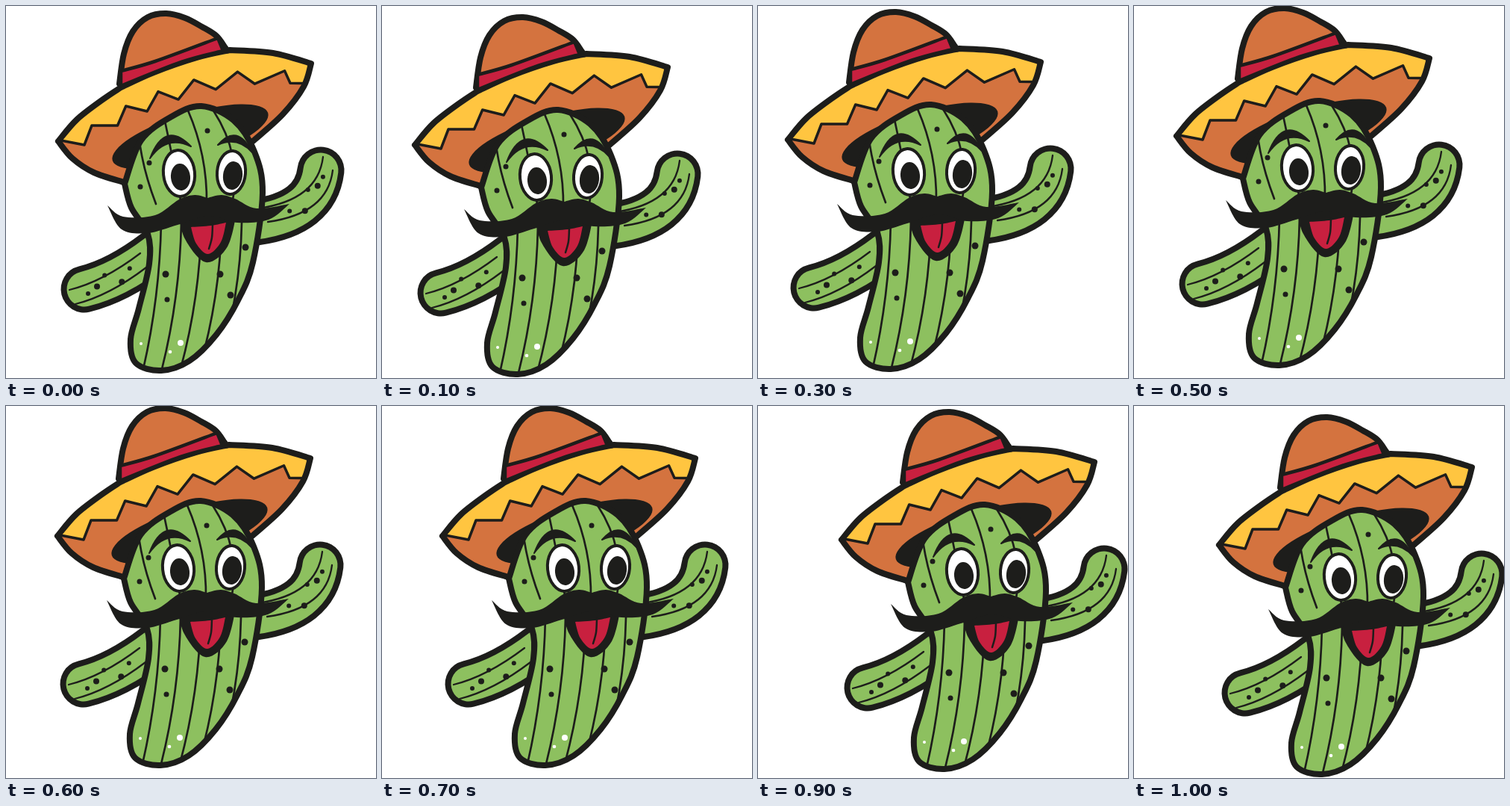
Recreate the animation shown at these times as an HTML page with a canvas. Size 496 by 498 pixels, loop 1200 ms.

```html
<!DOCTYPE html>
<html lang="en">
<head>
<meta charset="utf-8">
<title>Dancing cactus</title>
<style>
html, body { margin: 0; width: 100%; height: 100%; overflow: hidden; background: #fff; }
canvas { display: block; }
</style>
</head>
<body>
<canvas id="stage" width="496" height="498"></canvas>
<script>
const ctx = document.getElementById('stage').getContext('2d');
const INK = '#1d1d1b', GREEN = '#8dc05f', ORANGE = '#d4733f';
const YELLOW = '#ffc540', RED = '#c8203f', WHITE = '#fff';

// Smooth curve through "x,y x,y ..."; "|" makes a corner.
function curve(text) {
  const path = new Path2D();
  text.split('|').forEach((part, n) => {
    const p = part.trim().split(/\s+/).map(s => s.split(',').map(Number));
    if (n) path.lineTo(...p[0]); else path.moveTo(...p[0]);
    for (let i = 0; i < p.length - 1; i++) {
      const a = p[i - 1] || p[i], b = p[i], c = p[i + 1], d = p[i + 2] || c;
      path.bezierCurveTo(
        b[0] + (c[0] - a[0]) / 6, b[1] + (c[1] - a[1]) / 6,
        c[0] - (d[0] - b[0]) / 6, c[1] - (d[1] - b[1]) / 6, c[0], c[1]);
    }
  });
  return path;
}

function fill(path, color) {
  ctx.fillStyle = color;
  ctx.fill(path);
}

function stroke(path, width, color = INK) {
  ctx.lineWidth = width;
  ctx.strokeStyle = color;
  ctx.stroke(path);
}

function oval(x, y, rx, ry, tilt, color, line) {
  const path = new Path2D();
  path.ellipse(x, y, rx, ry, tilt, 0, 7);
  fill(path, color);
  if (line) stroke(path, line);
}

const dot = (x, y, r, color = INK) => oval(x, y, r, r, 0, color);

function inside(path, paint) {
  ctx.save();
  ctx.clip(path);
  paint();
  ctx.restore();
}

// A limb is one thick bent stroke, its ribs are shifted copies of the bend.
function drawArm(tip, bend, root, ribs) {
  const path = new Path2D(`M${tip} Q${bend} ${root}`);
  stroke(path, 63);
  stroke(path, 47, GREEN);
  for (const [dx, dy] of ribs) {
    ctx.save();
    ctx.translate(dx, dy);
    stroke(path, 2.3);
    ctx.restore();
  }
  for (let i = 0; i < 5; i++) {
    const t = 0.02 + i * 0.16, s = 1 - t;
    const at = k => s * s * tip[k] + 2 * s * t * bend[k] + t * t * root[k];
    const off = 9 * Math.sin(i * 2.2 + 0.8);
    dot(at(0) + off / 2, at(1) + off, 3 + i % 2);
  }
}

const brim = curve(`70,181 95,152 130,125 154,109 | 154,109 198,89 256,69 300,59 |
  300,59 358,63 409,77 | 409,77 399,108 371,145 331,181 | 331,181 158,236 |
  158,236 118,223 89,204 70,181`);
const crown = curve('152,104 158,64 170,34 190,15 215,10 240,16 263,28 282,40 294,56');
const band = curve('154,87 200,74 284,43 | 291,60 235,75 154,107 | 154,87');
const body = curve(`159,238 181,180 222,148 262,134 305,153 333,195 344,250 331,343 311,394
  282,440 246,475 208,488 174,478 167,446 178,405 192,345 190,305 168,270 159,238`);
const moustache = curve(`136,267 157,282 200,280 232,259 253,253 270,257 |
  270,257 289,253 307,258 336,271 380,265 |
  380,265 352,286 310,290 272,281 230,293 190,304 155,299 136,267`);
const mouth = curve('230,272 240,312 268,343 297,322 310,272');
const tongue = curve('248,296 255,318 271,332 288,316 295,290 | 295,290 275,294 248,296');
const groove = curve('277,292 276,310 272,325');
const brows = [
  new Path2D('M193,204 Q213,152 248,188 Q215,172 193,204'),
  new Path2D('M284,186 Q310,156 330,196 Q310,174 284,186')
];

// Teeth shrink and drift along two parabolas.
function zigzag() {
  const path = new Path2D('M60,178 L79,181');
  for (let k = 0; k < 7; k++) {
    const x = 105 + 46 * k - 12 * Math.sin(Math.PI * k / 6) ** 3;
    const peak = x + 10 + 1.2 * k * k;
    path.lineTo(x, 103 + 83 * ((365 - x) / 260) ** 2);
    if (k < 6) path.lineTo(peak, 86 + 74 * ((350 - peak) / 235) ** 2);
  }
  path.lineTo(420, 104);
  return path;
}

function drawHat() {
  const line = zigzag();
  const top = new Path2D(line);
  top.lineTo(420, 30);
  top.lineTo(60, 30);
  fill(brim, ORANGE);
  inside(brim, () => {
    fill(top, YELLOW);
    stroke(line, 3.5);
  });
  stroke(brim, 8);
  oval(247, 175, 109, 31, -0.297, INK);
  fill(crown, ORANGE);
  stroke(crown, 8);
  fill(band, RED);
  stroke(band, 4.5);
}

function drawBody() {
  fill(body, GREEN);
  inside(body, () => {
    for (let i = 0; i < 4; i++) {
      const x = 176 + 34 * i;
      stroke(new Path2D(`M${x},140 Q${x + 13 * i},200 ${x + 25},265`), 2.7);
    }
    for (let i = 0; i < 5; i++) {
      const x = 208 + 27 * i;
      stroke(new Path2D(`M${x},290 Q${x - 2},390 ${x - 24 - 2 * i},486`), 2.7);
    }
  });
  stroke(body, 8);
  const spots = [[214, 359], [270, 167], [287, 359], [192, 210],
    [321, 323], [180, 242], [301, 387], [216, 393]];
  spots.forEach(([x, y], i) => dot(x, y, i % 2 ? 3.5 : 4.5));
  dot(234, 451, 4, WHITE);
  dot(220, 463, 2.3, WHITE);
  dot(181, 452, 2, WHITE);
}

function drawFace() {
  oval(232, 224, 21, 31, -0.1, WHITE, 4);
  oval(302, 223, 19, 29, 0.08, WHITE, 4);
  oval(234, 229, 13, 18, -0.1, INK);
  oval(304, 227, 13, 19, 0.12, INK);
  for (const brow of brows) {
    fill(brow, INK);
    stroke(brow, 2);
  }
  fill(mouth, INK);
  fill(tongue, RED);
  stroke(groove, 2.5);
  fill(moustache, INK);
}

// One position per 100 ms beat, the last one held.
const dance = [[0, 0], [-26, 5], [-38, 3], [-30, -2], [-23, -6], [-13, -7],
  [-1, -7], [11, -7], [32, -7], [42, -2], [44, 5], [44, 5]];

function draw(now) {
  const beat = Math.floor((now % 1200) / 100);
  ctx.fillStyle = WHITE;
  ctx.fillRect(0, 0, 496, 498);
  ctx.save();
  ctx.translate(...dance[beat]);
  ctx.lineJoin = ctx.lineCap = 'round';
  drawArm([105, 379], [150, 368], [200, 330], [[-20, 1], [-12, 20]]);
  drawArm([422, 220], [415, 278], [335, 289], [[3, -18], [16, 0]]);
  drawHat();
  drawBody();
  drawFace();
  ctx.restore();
}

const start = performance.now();
function tick() {
  draw(performance.now() - start);
  requestAnimationFrame(tick);
}
tick();
</script>
</body>
</html>
```
